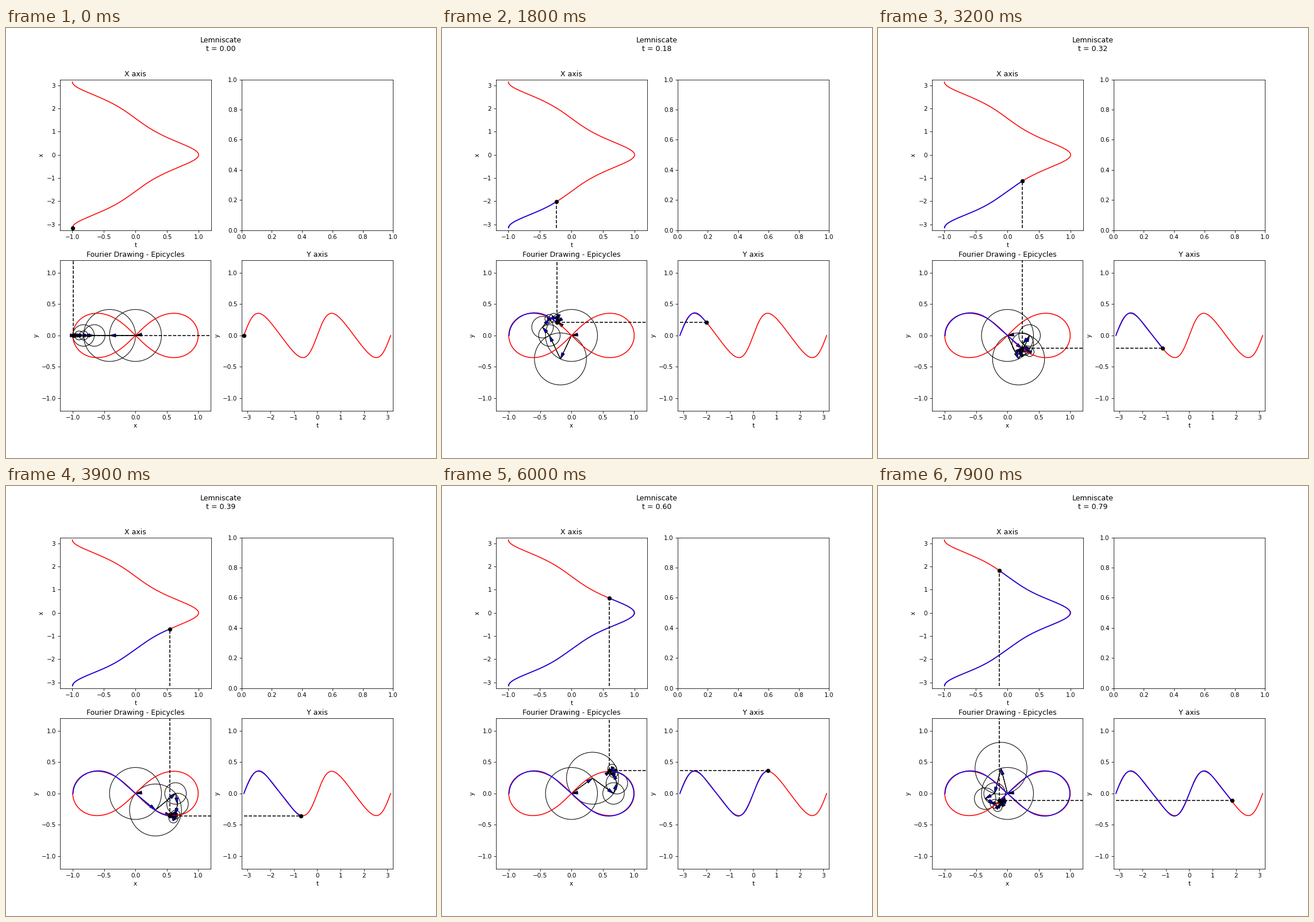
Write a matplotlib script that moves like this. It is 748 px wide and 748 px high and loops after 8 s.

```python
import numpy as np
import matplotlib.pyplot as plt
from matplotlib.animation import FuncAnimation
from matplotlib.patches import Circle, FancyArrow

PI = np.pi
LIM = 1.2          # half range of the x and y axes
ORDER = 5          # highest harmonic kept
FRAMES = 80
DT = 0.01          # share of a turn per frame

# Fourier coefficients of the lemniscate: q^|n|, negated for negative even n
Q = np.sqrt(2) - 1
harmonics = [0] + [s * n for n in range(1, ORDER + 1) for s in (1, -1)]


def coefficient(n):
    if n == 0:
        return -1e-9 * (1 + 0.14j)   # vanishing mean: only the arrow head shows
    return Q ** abs(n) * (-1 if n < 0 and n % 2 == 0 else 1)


coeffs = np.array([coefficient(n) for n in harmonics])


def epicycles(t):
    """Joints of the arm at angle t, from the origin to the pen."""
    arms = coeffs * np.exp(1j * np.array(harmonics) * t)
    return np.concatenate([[0], np.cumsum(arms)])


def label(ax, title, xlabel, ylabel, xlim, ylim):
    ax.set(title=title, xlabel=xlabel, ylabel=ylabel,
           xlim=(-xlim, xlim), ylim=(-ylim, ylim))


fig, ((ax_x, ax_empty), (ax_draw, ax_y)) = plt.subplots(
    2, 2, figsize=(10, 10), dpi=74.8)
heading = fig.suptitle("Lemniscate\nt = 0.00")

label(ax_x, "X axis", "t", "x", LIM, PI + 0.1)
label(ax_draw, "Fourier Drawing - Epicycles", "x", "y", LIM, LIM)
label(ax_y, "Y axis", "t", "y", PI + 0.1, LIM)
ax_draw.set_aspect("equal")

# Exact curve
s = np.linspace(-PI, PI, 1000)
cx = np.cos(s) / (1 + np.sin(s) ** 2)
cy = cx * np.sin(s)
ax_x.plot(cx, s, "r")
ax_draw.plot(cx, cy, "r")
ax_y.plot(s, cy, "r")

# Moving parts
circles = [ax_draw.add_patch(Circle((0, 0), abs(c), fill=False, ec="k", lw=1))
           for c in coeffs]
arrows = [ax_draw.add_patch(FancyArrow(
    0, 0, c.real, c.imag, width=0.001, head_width=0.05, head_length=0.1,
    length_includes_head=True, fc="b", ec="k")) for c in coeffs]

panels = (ax_x, ax_draw, ax_y)
trails = [ax.plot([], [], "b")[0] for ax in panels]
drop_x, rise, reach, drop_y = [
    ax.plot([], [], "k--")[0] for ax in (ax_x, ax_draw, ax_draw, ax_y)]
dots = [ax.plot([], [], "ko")[0] for ax in panels]

times = -PI + 2 * PI * DT * np.arange(FRAMES)
pen = np.array([epicycles(t)[-1] for t in times])


def update(i):
    t = times[i]
    x, y = pen[i].real, pen[i].imag
    heading.set_text(f"Lemniscate\nt = {i * DT:.2f}")

    joints = epicycles(t)
    for circle, arrow, a, b in zip(circles, arrows, joints[:-1], joints[1:]):
        circle.center = (a.real, a.imag)
        d = b - a
        arrow.set_data(x=a.real, y=a.imag, dx=d.real, dy=d.imag)

    px, py, pt = pen.real[:i + 1], pen.imag[:i + 1], times[:i + 1]
    paths = ((px, pt), (px, py), (pt, py))
    for trail, dot, (u, v) in zip(trails, dots, paths):
        trail.set_data(u, v)
        dot.set_data(u[-1:], v[-1:])

    drop_x.set_data([x, x], [-PI, t])
    rise.set_data([x, x], [y, LIM])
    reach.set_data([x, LIM], [y, y])
    drop_y.set_data([-PI, t], [y, y])
    return []


anim = FuncAnimation(fig, update, frames=FRAMES, interval=100,
                     repeat=True, repeat_delay=0)
plt.show()
```
